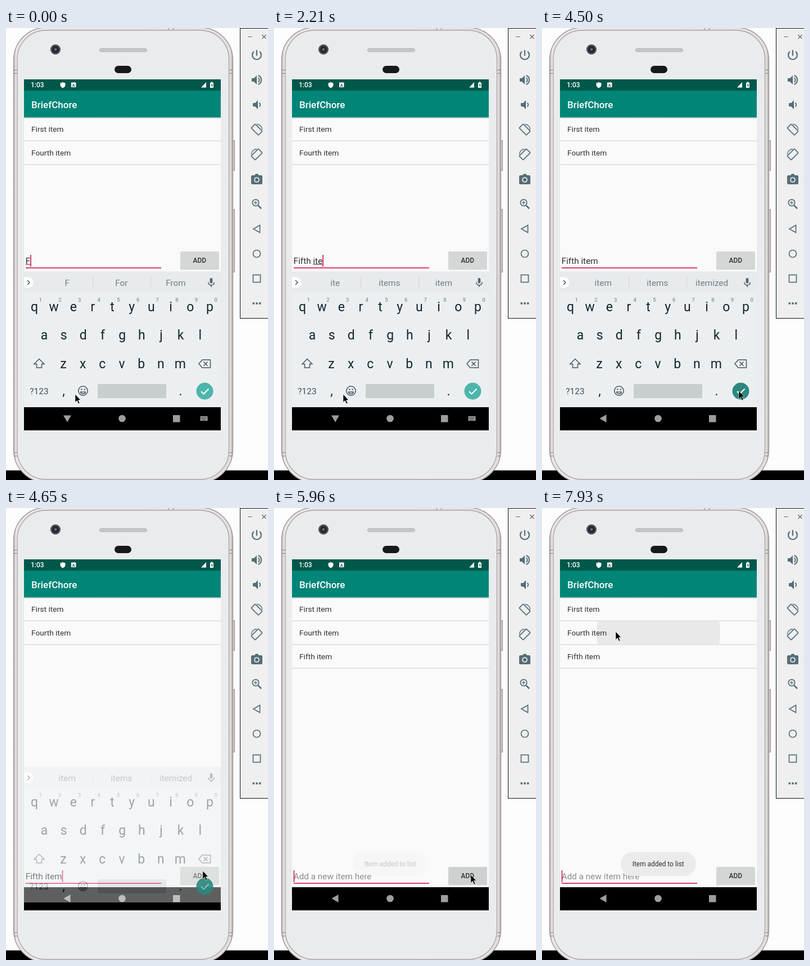
An HTML page that plays this animation: 466 px wide and 801 px high, repeating every 8000 ms.

```html
<!DOCTYPE html>
<html lang="en">
<head>
<meta charset="utf-8">
<title>To-do list on a phone</title>
<style>
html, body { margin: 0; width: 100%; height: 100%; overflow: hidden; background: #fff; }
svg { display: block; width: 100%; height: 100%; }
text { font-family: Roboto, "Noto Sans", sans-serif; fill: #303030; }
.mid { text-anchor: middle; }
.bold { font-weight: 500; }
.item { font-size: 13.7px; }
.field { font-size: 15.3px; }
.key { font-size: 23px; fill: #10252e; }
.digit { font-size: 9.5px; fill: #6f787d; }
.word { font-size: 15.3px; fill: #757b7f; }
.line { fill: none; stroke: #546e7a; stroke-width: 1.7; }
.kb { fill: none; stroke: #4a565c; stroke-width: 1.5; }
</style>
</head>
<body>
<svg viewBox="0 0 466 801">
  <defs>
    <clipPath id="screenClip"><rect x="32" y="91" width="350" height="622"/></clipPath>
    <clipPath id="rowClip"><rect x="32" y="200.5" width="350" height="41"/></clipPath>
    <linearGradient id="metal">
      <stop offset="0" stop-color="#bdb5b6"/><stop offset=".012" stop-color="#ebe6e7"/>
      <stop offset=".988" stop-color="#e4dfe0"/><stop offset="1" stop-color="#b5adae"/>
    </linearGradient>
    <linearGradient id="shade" x2="0" y2="1">
      <stop offset="0" stop-opacity=".18"/><stop offset="1" stop-opacity="0"/>
    </linearGradient>
  </defs>

  <!-- desktop -->
  <rect width="466" height="801" fill="#fdfdfd"/>
  <rect y="784" width="466" height="17"/>

  <!-- phone body -->
  <g fill="#d8d1d2" stroke="#8f898a">
    <rect x="402.5" y="199.5" width="4" height="53"/>
    <rect x="402.5" y="321.5" width="4" height="111"/>
  </g>
  <rect x="13.5" y="-1" width="390" height="806.5" rx="58" fill="url(#metal)" stroke="#989091" stroke-width="1.3"/>
  <rect x="20" y="4" width="376.5" height="796" rx="51" fill="#e9ebec" stroke="#aaa2a3" stroke-width="1.3"/>
  <path d="M14 74.500h6M14 80.500h6M397 74.500h6M397 80.500h6M14 752.500h6M14 758.500h6M397 752.500h6M397 758.500h6M289.500 0v3M297.500 0v3" stroke="#857e7f"/>
  <circle cx="88" cy="38" r="9" fill="#4a4d51"/>
  <circle cx="88" cy="38" r="6" fill="#202328"/>
  <circle cx="88" cy="38" r="2.500" fill="#5d6a78"/>
  <rect x="166.500" y="36.500" width="84" height="5.500" rx="2.700" fill="#c6c7c9" stroke="#b0b0b2"/>
  <rect x="193" y="67" width="30" height="13" rx="6.500" fill="#17181a"/>

  <!-- emulator panel -->
  <rect x="416.500" y=".5" width="60" height="514" fill="#efefef" stroke="#111"/>
  <path d="M430 15.500h8M455.500 12l7 7m0-7l-7 7" stroke="#666" stroke-width="1.200"/>
  <g id="panel" class="line"></g>

  <g clip-path="url(#screenClip)">
    <!-- app -->
    <rect x="32" y="91" width="350" height="622" fill="#fafafa"/>
    <rect x="32" y="91" width="350" height="20" fill="#00574b"/>
    <rect x="32" y="111" width="350" height="47.500" fill="#008577"/>
    <rect x="32" y="158.500" width="350" height="3" fill="url(#shade)"/>
    <g class="bold">
      <text x="44" y="105" font-size="12" style="fill:#fff">1:03</text>
      <text x="45" y="141.500" font-size="17" style="fill:#fff">BriefChore</text>
    </g>
    <path d="M101 96l4.500 1.800v3q0 3.700-4.500 5.700q-4.500-2-4.500-5.700v-3zM116 96.500h8.500v8.500h-8.500zM347 105.500h9v-9.500zM363 97h1.700v-1.500h2.600v1.500h1.700v9h-6z" fill="#fff"/>
    <text class="mid bold" x="120.200" y="103.500" font-size="7.500">A</text>
    <path d="M366.500 98l-2 3.700h1.500v3l2-3.700h-1.500z" fill="#00574b"/>

    <g clip-path="url(#rowClip)"><circle id="rowRipple" cy="221" fill="#e9e9e9"/></g>
    <g id="rows"></g>

    <g id="form">
      <text id="typed" class="field" x="34.700" y="417.600"></text>
      <rect id="composing" y="418.500" height="1" fill="#303030"/>
      <rect x="35" y="424.300" width="241" height="1.700" fill="#d81b60"/>
      <rect id="caret" y="402" width="1.700" height="21" fill="#d81b60"/>
      <rect x="310" y="397" width="69" height="31.500" rx="2" opacity=".13"/>
      <rect id="button" x="310" y="396" width="69" height="31.500" rx="2"/>
      <text class="mid bold" x="344.300" y="416" font-size="11.900">ADD</text>
    </g>

    <!-- navigation bar -->
    <rect x="32" y="672" width="350" height="41"/>
    <g fill="#9e9e9e">
      <path id="back" d="M-7-5.500H7L0 6.500z"/>
      <circle cx="206.500" cy="692" r="6.300"/>
      <rect x="297" y="686" width="12.500" height="12.500"/>
      <path id="switcher" d="M345.500 688h13v8h-13z"/>
      <path id="switcherKeys" d="M347 690.500h10M347 692.500h10M349 694.500h6" stroke="#000" stroke-dasharray="1 1"/>
    </g>

    <!-- soft keyboard -->
    <g id="keyboard">
      <rect x="32" y="431.500" width="350" height="240.500" fill="#eceff1"/>
      <rect x="32" y="431.500" width="350" height="38" fill="#e8ebed"/>
      <path d="M154.500 440v21M257.500 440v21" stroke="#d2d6d8"/>
      <path d="M32 441.500h7a9.500 9.500 0 0 1 0 19h-7z" fill="#fff"/>
      <path class="kb" d="M38 447l4 4-4 4"/>
      <g id="words"></g>
      <rect x="362.700" y="443" width="4.600" height="9.500" rx="2.300" fill="#59646a"/>
      <path class="kb" d="M359.700 450.500a5.300 5.300 0 0 0 10.600 0M365 456v3"/>
      <g id="keys"></g>
      <path class="kb" d="M59 586.500l-9 9h4.500v6.500h9v-6.500h4.500z"/>
      <path class="kb" d="M349 588h14.500v14h-14.500l-6-7zM351.500 591.500l7 7m0-7l-7 7"/>
      <text class="mid" x="59" y="649" font-size="15.500" style="fill:#434f55">?123</text>
      <circle class="kb" cx="137" cy="643" r="8.200"/>
      <path class="kb" d="M132.500 645a4.700 4.700 0 0 0 9 0z"/>
      <path d="M133 640.500h2.500m3 0h2.500" stroke="#4a565c" stroke-width="2.200"/>
      <rect x="163" y="631" width="122" height="25" rx="2" fill="#c8cdd0"/>
    </g>
    <g id="enter">
      <circle id="enterDisc" cx="353.500" cy="643.500" r="15"/>
      <path id="enterTick" d="M347 644l4.500 4.500 9-9" fill="none" stroke="#fff" stroke-width="2"/>
    </g>

    <g id="toast">
      <rect x="140" y="609.500" width="134" height="42.500" rx="21" fill="#ebebeb"/>
      <text class="mid" x="206.700" y="635" font-size="11.900">Item added to list</text>
    </g>
  </g>

  <path id="pointer" d="M0 0V14.500L3.300 11.300 5.800 17 8 16 5.600 10.500H9.800z" stroke="#fff" stroke-width=".6"/>
</svg>

<script>
const LOOP = 8000;
const $ = id => document.getElementById(id);
const set = (id, attrs) => {
  for (const name in attrs) $(id).setAttribute(name, attrs[name]);
};
const show = (id, on) => set(id, { visibility: on ? 'visible' : 'hidden' });
const text = (cls, x, y, s) => `<text class="${cls}" x="${x}" y="${y}">${s}</text>`;

// Last step of the list that has started at time t: [start, ...values]
const at = (t, steps) => steps.findLast(step => step[0] <= t).slice(1);

const speaker = '<path d="M-9-3h4l5-5v16l-5-5h-4z" fill="#546e7a" stroke="none"/>';
const rotate = '<rect x="-5" y="-9" width="10" height="18" rx="1" transform="rotate(-45)"/>' +
  '<path d="M0-9.500a9.500 9.500 0 0 1 9.500 9.500" stroke-width="1.400"/>';
const icons = [
  '<path d="M0-9V1M-5-6.500a8 8 0 1 0 10 0" stroke-width="2.200"/>',
  speaker + '<path d="M2.500-4a4.700 4.700 0 0 1 0 8M2.500-8a8.500 8.500 0 0 1 0 16" stroke-width="2"/>',
  `<g transform="translate(2 0)">${speaker}<path d="M2.500-3.500a4.500 4.500 0 0 1 0 7" stroke-width="2"/></g>`,
  rotate,
  `<g transform="scale(-1 1)">${rotate}</g>`,
  '<path d="M-8-7h4l2-2.500h4l2 2.500h4q2 0 2 2v12q0 2-2 2h-16q-2 0-2-2v-12q0-2 2-2z" fill="#546e7a" stroke="none"/>' +
    '<circle cy="1" r="4" stroke="#efefef"/>',
  '<circle cx="-2" cy="-2.500" r="5.700"/><path d="M2.500 2.500L8 8" stroke-width="2.500"/><path d="M-5-2.500h6M-2-5.500v6" stroke-width="1.300"/>',
  '<path d="M5.500-6.500v13L-6 0z"/>',
  '<circle r="6.500"/>',
  '<rect x="-6.500" y="-6.500" width="13" height="13"/>',
  '<path d="M-7.500 0h3.500M-1.700 0h3.500M4 0h3.500" stroke-width="3.500"/>'
];
$('panel').innerHTML = icons.map((icon, i) =>
  `<g transform="translate(446 ${48 + 44 * i})">${icon}</g>`).join('');

$('rows').innerHTML = ['First item', 'Fourth item', 'Fifth item'].map((name, i) =>
  `<g id="row${i}">${text('item', 45, 184 + 42 * i, name)}` +
  `<rect x="32" y="${199.3 + 42 * i}" width="350" height="1.500" fill="#dedede"/></g>`).join('');

const PITCH = 34.65;
const keyRow = (letters, x, y) => [...letters].map((c, i) => text('key mid', x + PITCH * i, y, c)).join('');
$('keys').innerHTML =
  keyRow('qwertyuiop', 50.5, 502) + keyRow('asdfghjkl', 68, 552) +
  keyRow('zxcvbnm', 102, 602.5) + keyRow(',', 102.5, 651) + keyRow('.', 310.5, 651) +
  [...'1234567890'].map((c, i) => text('digit mid', 61.3 + PITCH * i, 484.5, c)).join('');
$('words').innerHTML = [108.7, 205.3, 302].map(x => text('word mid', x, 456.5, '')).join('');

const NB = '\u00a0';
const HINT = 'Add a new item here';
// start, finished text, word being typed, three suggestions
const typing = [
  [0, '', 'F', 'F', 'For', 'From'],
  [120, '', 'Fi', 'Fi', 'Fire', 'Find'],
  [520, '', 'Fif', 'Fif', 'Fifth', 'Fifteen'],
  [800, '', 'Fift', 'Fift', 'Fifth', 'Fifty'],
  [920, '', 'Fifth', 'Fifth', 'Fifths', 'Fifty'],
  [1660, 'Fifth' + NB, '', 'grade', 'and', 'of'],
  [1940, 'Fifth' + NB, 'i', 'i', 'is', 'in'],
  [2060, 'Fifth' + NB, 'it', 'it', 'its', 'is'],
  [2210, 'Fifth' + NB, 'ite', 'ite', 'items', 'item'],
  [2640, 'Fifth' + NB, 'item', 'item', 'items', 'itemized'],
  [4500, 'Fifth' + NB + 'item', '', 'item', 'items', 'itemized'],
  [5840, '', '', '', '', '']
];
// moments at which the caret turns off and on again
const blinks = [1380, 1660, 3170, 3720, 4110, 4650, 5050, 5540, 6320, 6860, 7290, 7810];
const moves = [
  [0, 123, 649], [3420, 200, 611], [3570, 320, 624], [3720, 434, 653],
  [3870, 410, 651], [3990, 368, 646], [4110, 350, 643], [5420, 350, 650],
  [6320, 304, 607], [6470, 258, 500], [6590, 190, 340], [6710, 136, 241],
  [6860, 144, 209], [7010, 135, 217], [7660, 131, 219]
];

function drawField(t) {
  const [done, word, ...words] = at(t, typing);
  const field = $('typed');
  const empty = t >= 5840;
  const width = s => {
    field.textContent = s;
    return s ? field.getComputedTextLength() : 0;
  };
  const start = width(done), end = width(done + word);
  set('composing', { x: 34.7 + start, width: end - start });
  set('caret', { x: 34.7 + end });
  show('caret', blinks.filter(b => b <= t).length % 2 === 0);
  if (empty) field.textContent = HINT;
  field.style.fill = empty ? '#8c8c8c' : '#303030';
  [...$('words').children].forEach((el, i) => el.textContent = words[i]);
}

function draw(t) {
  drawField(t);
  const sliding = t >= 4650, closed = t >= 4770;
  set('form', { transform: `translate(0 ${sliding ? 240 : 0})` });

  const slide = `translate(0 ${sliding ? 27 : 0})`;
  set('keyboard', { transform: slide, opacity: sliding ? 0.4 : 1 });
  set('enter', { transform: slide, opacity: sliding ? 0.9 : 1 });
  set('enterDisc', { fill: at(t, [[0, '#4db6ac'], [4260, '#3fa39a'], [4380, '#329188'], [4500, '#2a887f']])[0] });
  set('enterTick', { opacity: sliding ? 0.45 : 1 });
  show('keyboard', !closed);
  show('enter', !closed);

  const [turn] = at(t, [[0, 0], [4260, 25], [4380, 65], [4500, 90]]);
  set('back', { transform: `translate(109 692) rotate(${turn})` });
  show('switcher', t < 4500);
  show('switcherKeys', t < 4500);

  set('button', { fill: at(t, [[0, '#d5d6d6'], [5840, '#c8cbcb'], [5960, '#ced1d0'], [6080, '#d4d6d6']])[0] });
  show('row2', t >= 5840);
  set('toast', { opacity: at(t, [[0, 0], [5840, 0.06], [5960, 0.25], [6080, 0.55], [6200, 0.85], [6320, 1]])[0] });

  const [cx, r] = at(t, [[0, 131, 0], [7810, 180, 60], [7930, 207, 110]]);
  set('rowRipple', { cx, r });
  set('pointer', { transform: `translate(${at(t, moves)})` });
}

const began = performance.now();
function tick() {
  draw((performance.now() - began) % LOOP);
  requestAnimationFrame(tick);
}
tick();
</script>
</body>
</html>
```
